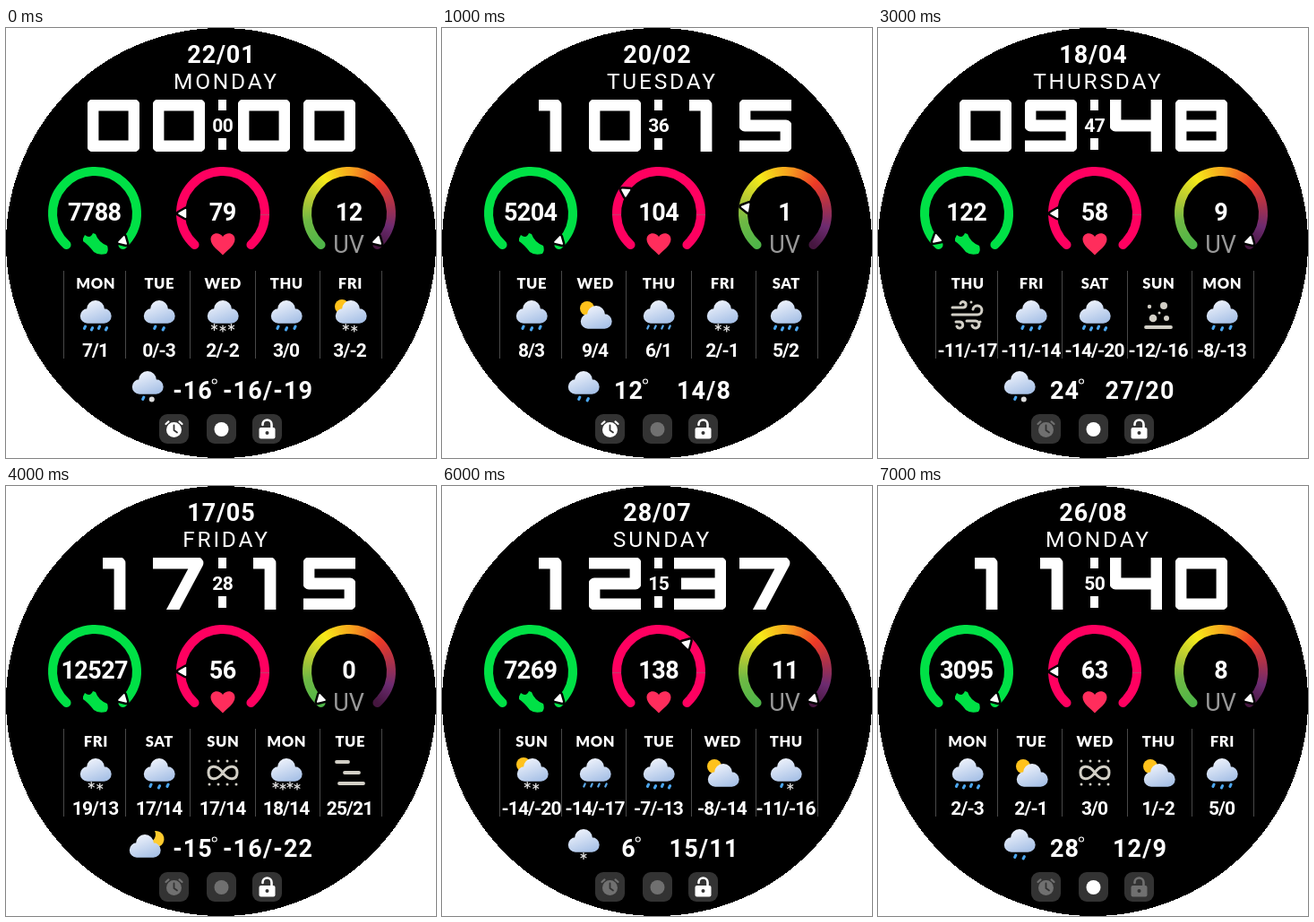
Animation, 480 px wide and 480 px high, one loop 8 s. Source, as an HTML page with a canvas:

```html
<!DOCTYPE html>
<html lang="en">
<head>
<meta charset="utf-8">
<title>Watch face</title>
<style>
html, body { margin: 0; width: 100%; height: 100%; overflow: hidden; background: #fff; }
canvas { display: block; }
</style>
</head>
<body>
<canvas id="face" width="480" height="480"></canvas>
<script>
const ctx = document.getElementById('face').getContext('2d');
const TAU = Math.PI * 2;
const WEEK = ['SUNDAY', 'MONDAY', 'TUESDAY', 'WEDNESDAY', 'THURSDAY', 'FRIDAY', 'SATURDAY'];
const COLUMNS = [100, 171, 242, 313, 384];

// One row per second: date, time, seconds, steps, pulse, uv, forecast icons,
// forecast temperatures, current icon, current temperature, range, lit status icons.
// Icon codes: S sun, M moon, c dry cloud, d drop, r fine drop, s snow, o hail.
const STATES = [
  '22/01|0000|00|7788|79|12|dddd dd sss ddd Sss|7/1 0/-3 2/-2 3/0 3/-2|do|-16|-16/-19|111',
  '20/02|1015|36|5204|104|1|ddd Sc rrrr ss dddd|8/3 9/4 6/1 2/-1 5/2|dd|12|14/8|101',
  '20/03|2030|02|578|168|2|dddd swirl dust rrrr ddd|17/14 23/17 23/17 25/20 18/12|s|16|-6/-14|110',
  '18/04|0948|47|122|58|9|wind ddd dddd dust ddd|-11/-17 -11/-14 -14/-20 -12/-16 -8/-13|do|24|27/20|011',
  '17/05|1715|28|12527|56|0|ss ddd haze ssss fog|19/13 17/14 17/14 18/14 25/21|Mc|-15|-16/-22|001',
  '15/06|1425|51|6410|112|4|Sc dd dddd fog ddd|24/18 22/16 19/14 20/15 21/16|Sc|21|24/17|011',
  '28/07|1237|15|7269|138|11|Sss rrrr dddd Sc ds|-14/-20 -14/-17 -7/-13 -8/-14 -11/-16|s|6|15/11|001',
  '26/08|1140|50|3095|63|8|dddd Sc haze Sc ddd|2/-3 2/-1 3/0 1/-2 5/0|dd|28|12/9|010'
].map(row => row.split('|'));

const DIGITS = [
  'M6 6H52V52H6Z', 'M17 6H36V58', 'M0 6H52V29H6V52H58', 'M0 6H52V52H0M8 29H52',
  'M6 0V29H52M52 0V58', 'M58 6H6V29H52V52H0', 'M58 6H6V52H52V29H6',
  'M0 6H50L19 64', 'M6 6H52V52H6ZM6 29H52', 'M52 29H6V6H52V52H0'
].map(d => new Path2D(d));
const DIGIT_CELL = new Path2D('M0 0H58V58H0Z');

const SHOE = new Path2D('M86 235L88 231Q94 236 97 229L100 230Q103 239 113 243Q115 248 112 252Q103 254 98 250Q92 242 86 238Z');
const HEART = new Path2D('M242 253.5C238 249 228.5 243 228.5 236C228.5 228.5 238 227 242 233C246 227 255.5 228.5 255.5 236C255.5 243 246 249 242 253.5Z');
const MOON = new Path2D('M8-14A9.2 9.2 0 1 1 1-1A9 9 0 0 0 8-14Z');
const AIR = {
  wind: 'M-17-8H-5a3.2 3.2 0 1 0-3-4.5M-17 0H11a5 5 0 1 0-5-6M-13 8H-9a3.5 3.5 0 1 1-3 5M-1 7H9a4 4 0 1 1-4 5',
  swirl: 'M-15 13H11a6.5 6.5 0 1 0-6-9M-15 7H-2',
  dust: 'M-14 14H14',
  haze: 'M0 0C-7-10-16-8-16 0S-7 10 0 0S16-8 16 0S7 10 0 0',
  fog: 'M-15-12H-2M-6 0H10M-12 12H15'
};
const DOTS = {
  wind: [4, -14, 1.5, 14, 8, 1.5],
  swirl: [-12, -4, 1.5, -9, -13, 1.5, -4, -6, 2, 2, -13, 1.5, 8, -7, 1.5],
  dust: [-10, -9, 2.2, 6, -10, 4, -6, 4, 4.3, 9, 4, 3, 1, -2, 1.5],
  haze: [-15, -13, 1.5, -5, -13, 1.5, 5, -13, 1.5, 15, -13, 1.5, -15, 13, 1.5, -5, 13, 1.5, 5, 13, 1.5, 15, 13, 1.5]
};

const roboto = (weight, size) => `${weight} ${size}px Roboto, sans-serif`;

function disc(x, y, r, color) {
  ctx.fillStyle = color;
  ctx.beginPath();
  ctx.arc(x, y, r, 0, TAU);
  ctx.fill();
}

// Black dial with a hard, unsmoothed edge.
function dial() {
  ctx.fillStyle = '#fff';
  ctx.fillRect(0, 0, 480, 480);
  ctx.fillStyle = '#000';
  for (let y = 0; y < 480; y++) {
    const half = Math.round(Math.sqrt(240 ** 2 - (y - 239.5) ** 2));
    ctx.fillRect(240 - half, y, 2 * half, 1);
  }
}

function line(path, color, width, cap = 'round') {
  ctx.strokeStyle = color;
  ctx.lineWidth = width;
  ctx.lineCap = cap;
  ctx.lineJoin = 'round';
  ctx.stroke(typeof path === 'string' ? new Path2D(path) : path);
}

function text(str, x, y, font, color = '#fff', spacing = 0) {
  ctx.font = font;
  ctx.letterSpacing = spacing + 'px';
  ctx.textAlign = 'center';
  ctx.fillStyle = color;
  ctx.fillText(str, x + spacing / 2, y);
  return ctx.measureText(str).width;
}

function at(x, y, draw) {
  ctx.save();
  ctx.translate(x, y);
  draw();
  ctx.restore();
}

function cloud() {
  const shade = ctx.createLinearGradient(-5, -16, 5, 11);
  shade.addColorStop(0, '#eef2fb');
  shade.addColorStop(1, '#a6c0e6');
  ctx.fillStyle = shade;
  ctx.beginPath();
  for (const [x, y, r] of [[-9, 1.5, 8.2], [0, -6, 10], [9.5, 1.5, 8.2]]) {
    ctx.moveTo(x + r, y);
    ctx.arc(x, y, r, 0, TAU);
  }
  ctx.rect(-9, -3, 18.5, 12.7);
  ctx.fill();
}

function precipitation(kinds) {
  const gap = kinds.length > 3 ? 8 : 9.5;
  [...kinds].forEach((kind, i) => {
    const x = (i - (kinds.length - 1) / 2) * gap;
    const y = 14 + (i % 2 && kind !== 'r' ? 1.5 : 0);
    if (kind === 'd') line(`M${x + 0.6} ${y - 1}L${x - 0.6} ${y + 1.5}`, '#4aa5ee', 3);
    if (kind === 'r') line(`M${x + 0.7} ${y - 1.5}L${x - 0.7} ${y + 1.5}`, '#5aa8ea', 2.2);
    if (kind === 'o') disc(x, y, 3, '#dcdcdc');
    if (kind === 's') {
      for (let k = 0; k < 3; k++) {
        const dx = 3.4 * Math.sin(k * Math.PI / 3), dy = 3.4 * Math.cos(k * Math.PI / 3);
        line(`M${x - dx} ${y - dy}L${x + dx} ${y + dy}`, '#e4e4e4', 1.3);
      }
    }
  });
}

function weather(code, x, y) {
  at(x, y, () => {
    if (AIR[code]) {
      line(AIR[code], '#d2cfc6', code === 'fog' || code === 'dust' ? 3.8 : 3);
      const dots = DOTS[code] || [];
      for (let i = 0; i < dots.length; i += 3) disc(dots[i], dots[i + 1], dots[i + 2], '#d2cfc6');
      return;
    }
    const dry = code.endsWith('c'), sun = code[0] === 'S', moon = code[0] === 'M';
    if (sun) disc(-9, dry ? -7 : -9, 8, '#ffc21c');
    if (moon) {
      ctx.fillStyle = '#ffcb2e';
      ctx.fill(MOON);
    }
    at(moon ? -3 : sun ? 1 : 0, dry ? 6 : 0, cloud);
    precipitation(code.replace(/[SMc]/g, ''));
  });
}

// Draws the ring and returns a function that draws its pointer.
function gauge(x, color, degrees) {
  const end = 138 * TAU / 360, top = -TAU / 4;
  ctx.beginPath();
  ctx.arc(x, 207, 47, top - end, top + end);
  ctx.strokeStyle = color;
  ctx.lineWidth = 10;
  ctx.lineCap = 'round';
  ctx.stroke();
  return () => at(x, 207, () => {
    ctx.rotate(Math.max(-134, Math.min(134, degrees)) * TAU / 360);
    const pointer = new Path2D('M0-49L4.3-41.5H-4.3Z');
    line(pointer, '#000', 6.5);
    line(pointer, '#fff', 1.5);
    ctx.fillStyle = '#fff';
    ctx.fill(pointer);
  });
}

function spectrum() {
  const stops = ['#4fb548', '#6fb944', '#b5c934', '#f6ea18', '#f7a01e', '#ee3a26', '#a2304f', '#6c2b70', '#45163f'];
  const angles = [-138, -100, -70, -35, 5, 45, 82, 108, 138];
  const sweep = ctx.createConicGradient(TAU / 4, 383, 207);
  stops.forEach((color, i) => sweep.addColorStop((angles[i] + 180) / 360, color));
  return sweep;
}

function statusIcons(lit) {
  const shade = i => lit[i] === '1' ? '#fff' : '#707070';
  ctx.fillStyle = '#333';
  for (const x of [171, 224, 275]) {
    ctx.beginPath();
    ctx.roundRect(x, 431, 33, 33, 9);
    ctx.fill();
  }
  disc(187.5, 448.5, 8.5, shade(0));
  line('M178.5 442l3-2.6M196.5 442l-3-2.6', shade(0), 2.2);
  line('M187.5 443.5V449L191 451.5', '#333', 1.8);
  disc(240.5, 448, 8, shade(1));
  ctx.fillStyle = shade(2);
  ctx.beginPath();
  ctx.roundRect(282.5, 446, 18, 12.5, 2);
  ctx.fill();
  line('M296.5 446V442.5a5 5 0 0 0-10 0v.5', shade(2), 2.6);
  disc(291.5, 452, 2, '#333');
}

function draw(index) {
  const [date, time, seconds, steps, pulse, uv, icons, temps, sky, now, range, lit] = STATES[index];
  const big = roboto(600, 27);
  const today = index + 1;
  const day = WEEK[today % 7];

  dial();
  text(date, 240, 38.5, big, '#fff', 0.8);
  text(day, 244.5, 67.5, roboto(400, 24.5), '#fff', day.length > 8 ? 0.4 : 2.8);

  [91, 164, 259, 332].forEach((x, i) => at(x, 80, () => {
    ctx.clip(DIGIT_CELL);
    line(DIGITS[time[i]], '#fff', 12.8, 'butt');
  }));
  ctx.fillStyle = '#fff';
  ctx.fillRect(237, 80, 9, 12);
  ctx.fillRect(237, 123, 9, 13);
  text(seconds, 242, 116, roboto(600, 21), '#fff', -0.6);

  const pointers = [
    gauge(99, '#00e146', steps > 3000 ? 134 : steps / 36 - 134),
    gauge(242, '#ff0060', Math.max(-90, 45 + 3 * (pulse - 138))),
    gauge(383, spectrum(), 54 * uv - 135)
  ];
  line('M190 208.5H200M284 208.5H294', '#c43a6a', 1, 'butt');
  pointers.forEach(drawPointer => drawPointer());
  ctx.fillStyle = '#00e146';
  ctx.fill(SHOE);
  ctx.fillStyle = '#ff2d5c';
  ctx.fill(HEART);
  text('UV', 382.5, 250.5, roboto(400, 27), '#999');
  [steps, pulse, uv].forEach((value, i) => text(value, [99, 242, 383][i], 214.5, big, '#fff', -0.6));

  line([64, 133, 205, 278, 350, 419].map(x => `M${x + 0.5} 271V369`).join(''), '#484848', 1, 'butt');
  COLUMNS.forEach((x, i) => {
    text(WEEK[(today + i) % 7].slice(0, 3), x, 290.5, '900 16.5px "Lato Black", Lato, sans-serif', '#fff', 0.6);
    weather(icons.split(' ')[i], x, 320);
    text(temps.split(' ')[i], x, 367, roboto(600, 21), '#fff', -0.9);
  });

  weather(sky, 158, 399);
  const width = text(now, 208, 413.5, big, '#fff', 1);
  ctx.beginPath();
  ctx.arc(208 + width / 2 + 2.5, 394.5, 2.5, 0, TAU);
  ctx.strokeStyle = '#fff';
  ctx.lineWidth = 1.1;
  ctx.stroke();
  text(range, 292, 413.5, big, '#fff', 1.2);
  statusIcons(lit);
}

function tick() {
  draw(Math.floor(performance.now() / 1000) % STATES.length);
  requestAnimationFrame(tick);
}
tick();
</script>
</body>
</html>
```
